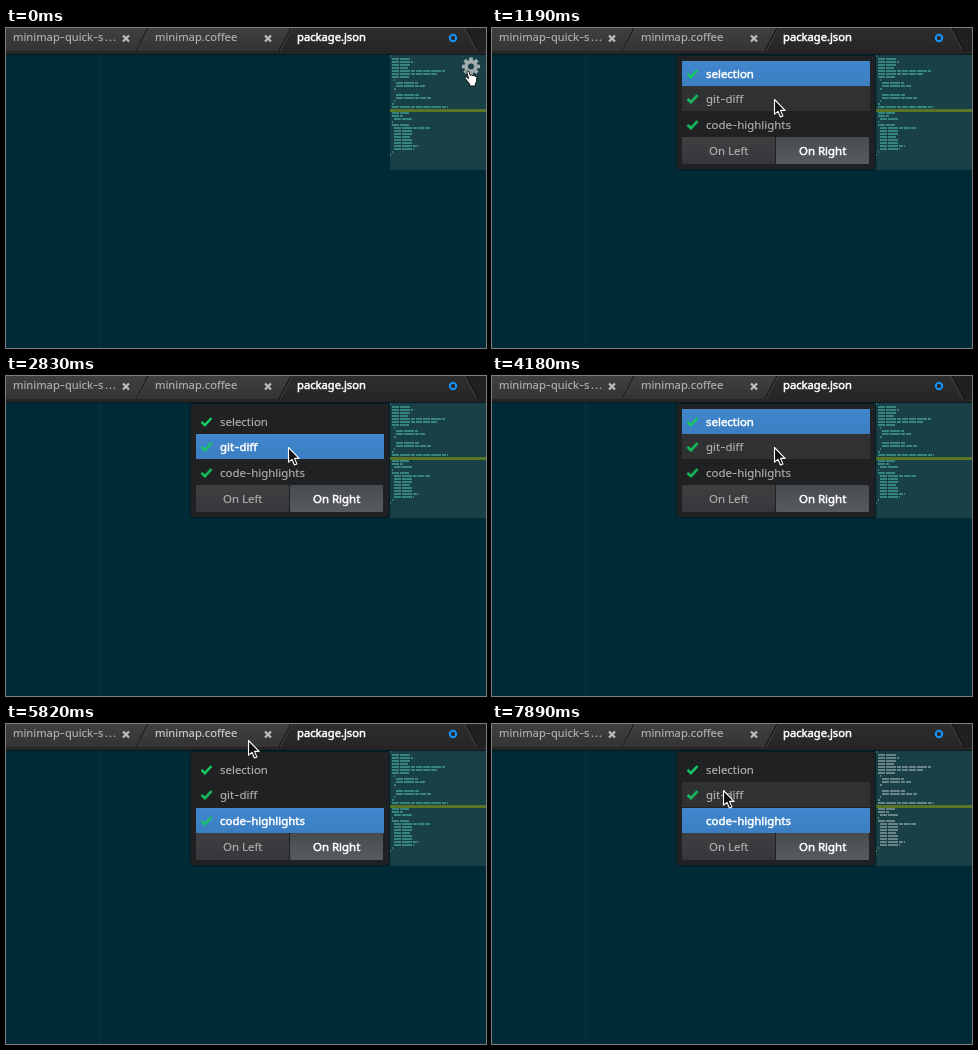
These frames come from a looping animation (480x320 px, 8000 ms). An HTML page:

```html
<!DOCTYPE html>
<html lang="en">
<head>
<meta charset="utf-8">
<title>Minimap plugin menu</title>
<style>
html, body { margin: 0; width: 100%; height: 100%; overflow: hidden; background: #002b36; }
svg { display: block; width: 480px; height: 320px; }
text { font: 11.45px "Noto Sans", "Open Sans", sans-serif; fill: #b0b0b0; stroke: #b0b0b0; stroke-width: .15px; }
.dash { font-family: Inter, sans-serif; }
.tabs text { font-size: 11.2px; }
.tabs .active, .bright { fill: #fff; stroke: #fff; stroke-width: .5px; }
.close { stroke: #bcbcbc; stroke-width: 2.2; }
.check { fill: none; stroke: #14c862; stroke-width: 2.5; }

.anim { animation: 8s step-end infinite; }
#popup { animation-name: popup; }
#panel { filter: drop-shadow(0 0 1.5px #000a); }
#gear { animation-name: gear; }
#hand { animation-name: hand; }
#arrow { animation-name: arrow; }
#bar { animation-name: bar; }
#hover { animation-name: hover; }
#selection { animation-name: selection; }
#git { animation-name: git; }
#code { animation-name: code; }
.git-on { animation-name: git-on; }
#code-on { animation-name: code-on; }
#lines { animation-name: lines; }
#tab { animation-name: tab; }

@keyframes popup { 0% { opacity: 0 } 5.5%, 100% { opacity: 1 } }
@keyframes gear { 0% { opacity: 1 } 11.125%, 100% { opacity: 0 } }
@keyframes hand { 0% { opacity: 1 } 11.125%, 100% { opacity: 0 } }
@keyframes arrow {
  0% { transform: translate(430px, 60px); opacity: 0 }
  11.125% { transform: translate(422px, 62px); opacity: 1 }
  13% { transform: translate(312px, 71px) }
  14.875% { transform: translate(282px, 71px) }
  67.125% { transform: translate(279px, 67px) }
  68.98% { transform: translate(268px, 52px) }
  70.84% { transform: translate(253px, 31px) }
  72.7% { transform: translate(242px, 16px) }
  74.55% { transform: translate(238px, 19px) }
  76.41% { transform: translate(235px, 42px) }
  78.26% { transform: translate(232px, 74px) }
  80.125% { transform: translate(230px, 92px) }
  91.25% { transform: translate(231px, 92px) }
  93% { transform: translate(231px, 93px) }
  96.75% { transform: translate(231px, 79px) }
  98.625%, 100% { transform: translate(231px, 66px); opacity: 1 }
}
@keyframes bar {
  0%, 52.25% { transform: none }
  26.125%, 35.375%, 57.75% { transform: translateY(25px) }
  29.875%, 61.5%, 100% { transform: translateY(51px) }
}
@keyframes hover {
  0%, 70.84%, 80.125% { opacity: 0; transform: none }
  13%, 78.26%, 96.75%, 100% { opacity: 1; transform: none }
  68.98%, 76.41% { opacity: 1; transform: translateY(-25px) }
}
@keyframes selection {
  0%, 52.25% { fill: #fff; stroke: #fff; stroke-width: .5px }
  26.125%, 57.75%, 100% { fill: #b0b0b0; stroke: #b0b0b0; stroke-width: .15px }
}
@keyframes git {
  0%, 29.875%, 52.25%, 61.5%, 100% { fill: #b0b0b0; stroke: #b0b0b0; stroke-width: .15px }
  26.125%, 35.375%, 57.75% { fill: #fff; stroke: #fff; stroke-width: .5px }
}
@keyframes code {
  0%, 35.375% { fill: #b0b0b0; stroke: #b0b0b0; stroke-width: .15px }
  29.875%, 61.5%, 100% { fill: #fff; stroke: #fff; stroke-width: .5px }
}
@keyframes git-on { 0%, 48.5%, 100% { opacity: 1 } 42.875% { opacity: 0 } }
@keyframes code-on { 0% { opacity: 1 } 82%, 100% { opacity: 0 } }
@keyframes lines { 0% { stroke: #37847f } 83.75%, 100% { stroke: #688486 } }
@keyframes tab { 0%, 76.41%, 100% { fill: #b0b0b0 } 72.7% { fill: #d8d8d8 } }
</style>
</head>
<body>
<svg viewBox="0 0 480 320">
  <defs>
    <linearGradient id="tabFill" x2="0" y2="1"><stop stop-color="#404040"/><stop offset="1" stop-color="#333"/></linearGradient>
    <linearGradient id="activeFill" x2="0" y2="1"><stop stop-color="#2e2e2e"/><stop offset="1" stop-color="#252525"/></linearGradient>
    <linearGradient id="blue" x2="0" y2="1"><stop stop-color="#4087cd"/><stop offset="1" stop-color="#3c7ec2"/></linearGradient>
    <linearGradient id="offFill" x2="0" y2="1"><stop stop-color="#3e4042"/><stop offset="1" stop-color="#35373a"/></linearGradient>
    <linearGradient id="onFill" x2="0" y2="1"><stop stop-color="#484b4f"/><stop offset="1" stop-color="#575b60"/></linearGradient>
    <path id="x" d="M-3-3 3 3M3-3-3 3"/>
    <path id="tick" d="M0 4.6 3.4 8 10 .8"/>
  </defs>

  <rect width="480" height="320" fill="#002b36"/>
  <path d="M93.5 26V320" stroke="#0a343f"/>

  <g class="tabs">
    <rect width="480" height="26" fill="#202020"/>
    <path d="M0 0H142L130 24H0Z" fill="url(#tabFill)"/>
    <path d="M142 0H285L273 24H130Z" fill="url(#tabFill)"/>
    <path d="M142 0 130 24" stroke="#1b1b1b" stroke-width="1.3"/>
    <rect y="23" width="480" height="3" fill="#252525"/>
    <path d="M285 0H460L472 24H273Z" fill="url(#activeFill)"/>
    <path d="M285 0 273 23M460 0 472 23" stroke="#161616" stroke-width="1.3"/>
    <path d="M143.2 0 131.2 23M286.2 0 274.2 23M458.8 0 470.8 23" stroke="#4a4a4a" stroke-width=".8"/>
    <rect y="26" width="480" height="1" fill="#0b1a1f"/>
    <text x="7" y="13.3">minimap<tspan class="dash">-</tspan>quick<tspan class="dash">-</tspan>s<tspan x="99" letter-spacing="1">...</tspan></text>
    <text id="tab" class="anim" x="149" y="13.3">minimap.coffee</text>
    <text class="active" x="291" y="13.3">package.json</text>
    <g class="close"><use href="#x" x="120" y="10.5"/><use href="#x" x="262" y="10.5"/></g>
    <circle cx="447" cy="10" r="3.2" fill="none" stroke="#1095fc" stroke-width="2"/>
  </g>

  <rect x="384" y="27" width="96" height="115" fill="#1a4047"/>
  <path id="lines" class="anim" fill="none" stroke-width="2" stroke-dasharray="7 1 10 1 4 1 6 1"/>
  <rect class="anim git-on" x="384" y="81" width="96" height="3" fill="#5a7425"/>
  <path id="gear" class="anim" fill="#9fabac" fill-rule="evenodd"/>

  <g id="popup" class="anim">
    <rect id="panel" x="185" y="28" width="198" height="113" rx="2" fill="#202122"/>
    <rect id="hover" class="anim" x="190" y="58" width="188" height="25" fill="#303132"/>
    <rect id="bar" class="anim" x="190" y="33" width="188" height="25" fill="url(#blue)"/>
    <g class="check">
      <use href="#tick" x="195.5" y="41.2"/>
      <use class="anim git-on" href="#tick" x="195.5" y="66.2"/>
      <use id="code-on" class="anim" href="#tick" x="195.5" y="92.2"/>
    </g>
    <text id="selection" class="anim" x="214" y="50">selection</text>
    <text id="git" class="anim" x="214" y="75">git<tspan class="dash">-</tspan>diff</text>
    <text id="code" class="anim" x="214" y="101">code<tspan class="dash">-</tspan>highlights</text>
    <rect x="190" y="109" width="93" height="27" rx="1.5" fill="url(#offFill)"/>
    <rect x="284" y="109" width="93" height="27" rx="1.5" fill="url(#onFill)"/>
    <text x="217" y="127">On Left</text>
    <text class="bright" x="307" y="127">On Right</text>
  </g>

  <path id="hand" class="anim" fill="#fff" stroke="#111" stroke-width="1" stroke-linejoin="round"
    d="M462 54 459.2 50.4Q458.6 48.8 460.3 48.8L462.6 50.6 460.8 44Q461 42.2 462.7 43L464.4 47.6Q465.6 46.4 466.7 47.7 468.2 46.8 469 48.2 470.6 47.8 470.8 49.6L470.5 53.5 469.4 55.5V58H463.6V56Z"/>
  <path id="arrow" class="anim" fill="#111" stroke="#fff" stroke-width="1.1" stroke-linejoin="round"
    d="M.5.5V15.2L4 12.3 6.4 18 8.9 16.9 6.5 11.4H11.1Z"/>
</svg>
<script>
// Minimap rows, 3px apart: left edge and length; 0 0 leaves a gap.
const rows = `384 1 386 18 386 21 386 19 386 16 386 53 386 45 386 17 388 1 390 22 390 29
  388 2 0 0 390 24 390 35 388 1 386 2 386 56 0 0 386 17 386 11 388 19 386 1 386 17
  388 36 388 18 388 19 388 16 388 19 388 18 388 25 388 20 386 1 384 1`.match(/\d+ \d+/g);
document.getElementById('lines').setAttribute('d', rows.map((row, i) => {
  const [x, w] = row.split(' ');
  return +w ? `M${x} ${28 + i * 3}h${w}` : '';
}).join(''));

// Eight teeth, each an outer pair and an inner pair of points.
const polar = (r, a) => `${(465 + r * Math.cos(a)).toFixed(2)} ${(38.5 + r * Math.sin(a)).toFixed(2)}`;
const teeth = [];
for (let i = 0; i < 8; i++) {
  const a = i * Math.PI / 4;
  teeth.push(polar(9.2, a - .2), polar(9.2, a + .2), polar(6.7, a + .28), polar(6.7, a + .5));
}
document.getElementById('gear').setAttribute('d',
  `M${teeth.join('L')}ZM468 38.5a3 3 0 1 0-6 0a3 3 0 1 0 6 0Z`);
</script>
</body>
</html>
```
